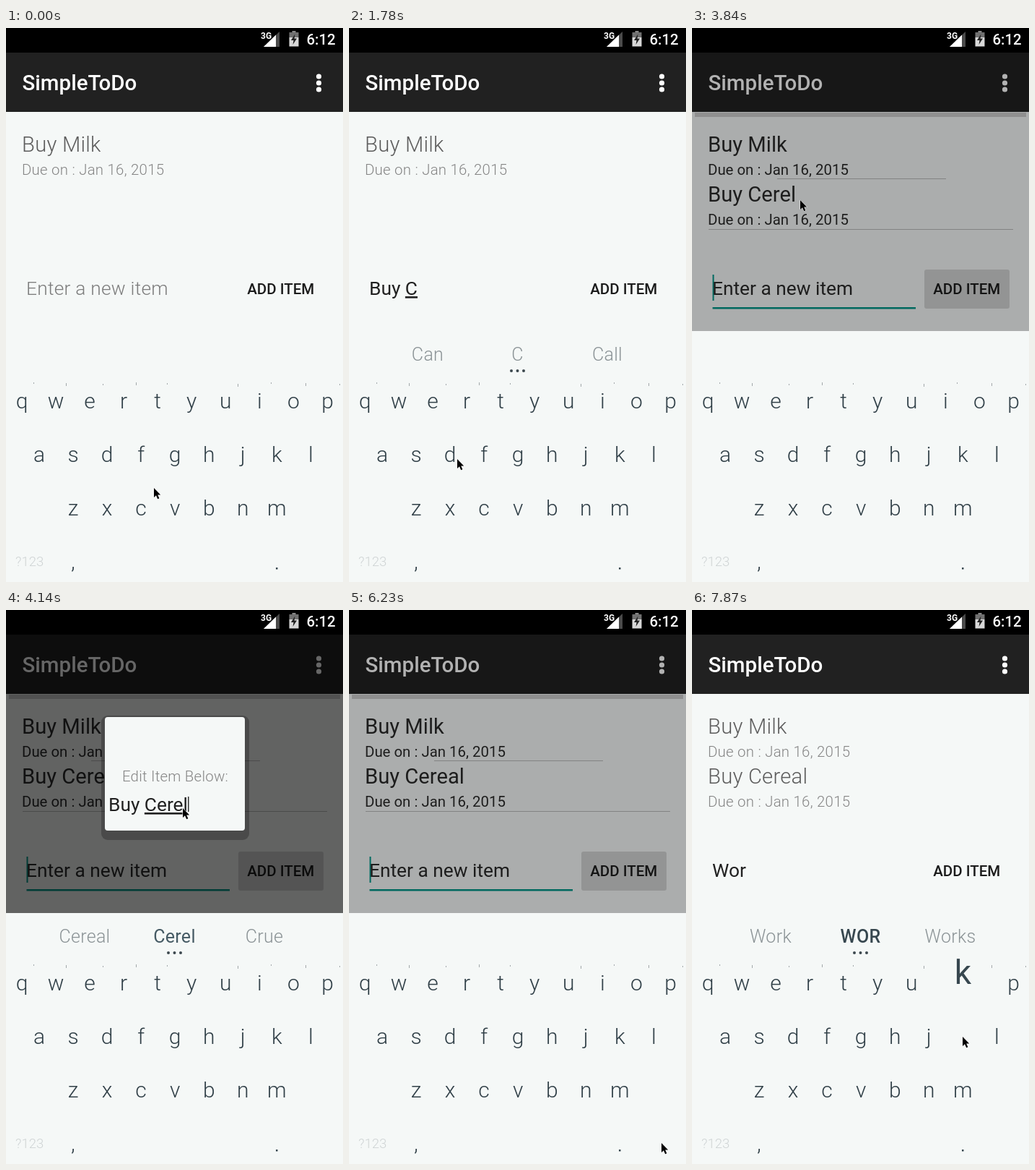
Recreate the animation shown at these times as an HTML page. Size 467 by 766 pixels, loop 8000 ms.

```html
<!DOCTYPE html>
<html lang="en">
<head>
<meta charset="utf-8">
<title>To-do list</title>
<style>
  html, body { margin: 0; width: 100%; height: 100%; overflow: hidden; background: #f5f8f7; }
  svg { display: block; width: 467px; height: 766px; font-family: Roboto, sans-serif; }
  .mid { text-anchor: middle; }
  .title { font-size: 29.5px; font-weight: 500; fill: #fff; }
  .clock { font-size: 20.4px; font-weight: 500; fill: #fff; }
  .net { font-size: 12px; font-weight: 700; fill: #fff; }
  .item, .due, .field.empty { font-weight: 300; letter-spacing: .25px; }
  .item { font-size: 29.2px; fill: #5c5c5c; }
  .due { font-size: 20.4px; fill: #858585; }
  .field { font-size: 26.3px; fill: #212121; }
  .field.empty { fill: #7c7c7c; }
  .add { font-size: 20.5px; font-weight: 500; fill: #1c1c1c; }
  .dimmed :is(.item, .due, .field) { font-weight: 400; letter-spacing: 0; fill: #2a2a2a; }
  .under { text-decoration: underline 1.2px; }
  .key { font-size: 30px; font-weight: 300; fill: #303f47; }
  .big { font-size: 46px; fill: #37474f; }
  .sug { font-size: 25px; font-weight: 300; letter-spacing: .3px; fill: #8b9396; }
  .sug.long { font-size: 19px; letter-spacing: 0; }
  .sug.on { font-weight: 400; fill: #455a64; }
  .sug.strong { font-weight: 500; fill: #37474f; }
  .sym { font-size: 18.5px; font-weight: 300; fill: #cfd4d5; }
</style>
</head>
<body>
<svg id="stage" viewBox="0 0 467 766"></svg>
<script>
const LOOP = 8000, BG = '#f5f8f7';
const stage = document.getElementById('stage');

const text = (x, y, cls, s) => `<text x="${x}" y="${y}" class="${cls}">${s}</text>`;
const rect = (x, y, w, h, fill, more = '') =>
  `<rect x="${x}" y="${y}" width="${w}" height="${h}" fill="${fill}" ${more}/>`;
const dot = (x, y, r, fill) => `<circle cx="${x}" cy="${y}" r="${r}" fill="${fill}"/>`;
const path = (d, fill) => `<path d="${d}" fill="${fill}"/>`;

const rows = [['qwertyuiop', 22, 515.5], ['asdfghjkl', 46, 590], ['zxcvbnm', 93, 664]];
const keys = {};
for (const [letters, x, y] of rows)
  [...letters].forEach((c, i) => keys[c] = [x + i * 47.05, y]);

// [time, changes]: each step keeps everything it does not change
const steps = [
  [0, { at: [205, 636], caps: false, value: '', under: false, tips: [], press: '',
        second: '', dim: 0, edit: '', caret: 0 }],
  [150, { at: [25, 668], caps: true }],
  [300, { at: [284, 668], press: 'b', value: 'B' }],
  [450, { at: [296, 606], press: '', caps: false, tips: ['But', 'B', 'By'] }],
  [600, { at: [307, 520], press: 'u', value: 'Bu' }],
  [750, { at: [280, 520], press: '', tips: ['But', 'Bu', 'Buy'] }],
  [900, { at: [259, 520], press: 'y', value: 'Buy' }],
  [1050, { at: [252, 740], press: '', tips: ['By', 'But', 'Busy'] }],
  [1200, { at: [120, 708], value: 'Buy ', tips: [] }],
  [1350, { at: [25, 668], caps: true }],
  [1500, { at: [190, 668], press: 'c', value: 'Buy C', under: true }],
  [1650, { at: [150, 596], press: '', caps: false, tips: ['Can', 'C', 'Call'] }],
  [1800, { at: [119, 520], press: 'e', value: 'Buy Ce' }],
  [1950, { at: [166, 520], press: 'r', value: 'Buy Cer', tips: ['Cell', 'Ce', 'Center'] }],
  [2100, { at: [140, 520], press: '', tips: ['Cert', 'Cer', 'Certain'] }],
  [2230, { at: [119, 520], press: 'e', value: 'Buy Cere' }],
  [2380, { at: [300, 562], press: '', tips: ['Cere', 'Cereal', 'Ceremony'] }],
  [2530, { at: [425, 591], press: 'l', value: 'Buy Cerel' }],
  [2670, { at: [363, 371], press: '', tips: ['Creek', 'Cereal', 'Ceremony'] }],
  [2970, { value: '', under: false, tips: [], second: 'Buy Cerel' }],
  [3120, { at: [300, 330] }],
  [3270, { at: [210, 270] }],
  [3400, { at: [150, 238] }],
  [3700, { dim: .3 }],
  [3850, { at: [172, 246], dim: .6, edit: 'Buy Cerel' }],
  [3990, { at: [226, 268] }],
  [4140, { at: [245, 274], under: true, caret: 252, tips: ['Cereal', 'Cerel', 'Crue'] }],
  [4290, { at: [300, 380] }],
  [4440, { at: [370, 500] }],
  [4590, { at: [415, 588] }],
  [4740, { at: [433, 664], edit: 'Buy Cere', caret: 0 }],
  [4890, { at: [250, 632], tips: ['Cere', 'Cereal', 'Ceremony'] }],
  [5040, { at: [48, 591], press: 'a', edit: 'Buy Cerea' }],
  [5190, { at: [250, 594], press: '', tips: ['Cereals', 'Cereal', 'Area'] }],
  [5340, { at: [424, 591], press: 'l', edit: 'Buy Cereal' }],
  [5490, { at: [433, 737], press: '', under: false, tips: [], caret: 264 }],
  [5780, { caret: 0 }],
  [6230, { dim: .3, edit: '', second: 'Buy Cereal' }],
  [6380, { dim: 0 }],
  [6670, { at: [25, 668], caps: true }],
  [6820, { at: [50, 596] }],
  [6970, { at: [72, 520], press: 'w', value: 'W' }],
  [7120, { at: [230, 524], press: '', caps: false, tips: ['We', 'W', 'Will'] }],
  [7270, { at: [400, 520], press: 'o', value: 'Wo' }],
  [7420, { at: [280, 520], press: '', tips: ['Would', 'Wo', 'Work'] }],
  [7570, { at: [167, 520], press: 'r', value: 'Wor' }],
  [7720, { at: [290, 562], press: '', tips: ['Work', 'WOR', 'Works'] }],
  [7870, { at: [375, 590], press: 'k' }],
];
const states = [];
for (const [, change] of steps) states.push({ ...states.at(-1), ...change });

const statusBar =
  rect(0, 0, 467, 34, '#000') + text(353, 15, 'net', '3G') +
  path('M357 26H379V5z', '#4a4a4a') + path('M357 26H374V9.5z', '#fff') +
  rect(396.5, 4, 5, 3, '#888') + rect(392.5, 6, 13, 7, '#707070') + rect(392.5, 13, 13, 12.5, '#d8d8d8') +
  path('M400.5 8.5L395 17H398.5L397.5 23L403 14.5H399.5z', '#222') +
  text(416.5, 23, 'clock', '6:12');

const actionBar =
  rect(0, 34, 467, 82, '#212121') + text(22.5, 86, 'title', 'SimpleToDo') +
  [67, 76, 85].map(y => dot(433.5, y, 3.6, '#fff')).join('');

const entry = (name, y) =>
  text(22, y, 'item', name) + text(22, y + 32, 'due', 'Due on : Jan 16, 2015');

// Marks the word being composed
const typed = (s, under) =>
  under ? s.replace(/\S+$/, '<tspan class="under">$&</tspan>') : s;

// Details that only show up while the screen is darkened
const widgets =
  rect(4, 117, 459, 6, '#ccc') + rect(118, 208, 234, 1, '#bbb') + rect(23, 278, 422, 1, '#bbb') +
  rect(322, 334, 118, 54, '#d2d4d3', 'rx="3"') +
  rect(28.5, 386, 281.5, 2.5, '#009688') + rect(28.5, 341, 2, 36, '#009688');

function screen(s) {
  const field = s.value
    ? text(28, 369, 'field', typed(s.value, s.under))
    : text(28, 369, 'field empty', 'Enter a new item');
  return `<g class="${s.dim ? 'dimmed' : ''}">` + actionBar + (s.dim ? widgets : '') +
    entry('Buy Milk', 171) + (s.second ? entry(s.second, 240) : '') +
    field + text(380.7, 368, 'add mid', 'ADD ITEM') + '</g>' +
    (s.dim ? rect(0, 34, 467, 385, '#000', `opacity="${s.dim}"`) : '');
}

function dialog(s) {
  if (!s.edit) return '';
  return rect(132, 146, 205, 172, '#000', 'rx="9" opacity=".25"') +
    rect(137, 148, 194, 157, BG, 'rx="4"') +
    text(234.5, 237, 'due mid', 'Edit Item Below:') +
    text(142, 278, 'field', typed(s.edit, s.under)) +
    (s.caret ? rect(s.caret, 258, 1.5, 21, '#333') : '');
}

function suggestions(tips) {
  if (!tips.length) return '';
  const style = w =>
    w.length > 7 ? ' long' : w === 'WOR' ? ' strong' : w === 'Cerel' ? ' on' : '';
  return tips.map((w, i) => text(109 + i * 124.5, 460, 'sug mid' + style(w), w)).join('') +
    [225, 233.5, 242].map(x => dot(x, 474, 2, '#3c484e')).join('');
}

function popup(c, label) {
  const [x, y] = keys[c];
  return rect(x - 38, y - 112, 76, 72, BG) + rect(x - 21, y - 41, 42, 61, BG) +
    text(x, y - 73, 'big mid', label);
}

const hints = [38, 83, 134, 180, 223, 321, 367, 415, 462]
  .map((x, i) => rect(x, 490 + i % 3, 1, i % 2 ? 4 : 2, '#a2a8aa')).join('');

function keyboard(s) {
  const label = c => s.caps ? c.toUpperCase() : c;
  return rect(0, 419, 467, 347, BG) + suggestions(s.tips) + hints +
    Object.entries(keys).map(([c, [x, y]]) => text(x, y + 10, 'key mid', label(c))).join('') +
    text(13, 744, 'sym', '?123') + text(93, 748, 'key mid', ',') +
    rect(374, 746, 2.5, 2.5, '#37474f') +
    (s.press ? popup(s.press, label(s.press)) : '');
}

const pointer = ([x, y]) =>
  `<path transform="translate(${x} ${y})" d="M0 0V13L3 10.2L5.2 15.2L7.4 14.2L5.2 9.4H9.2z" ` +
  'stroke="#fff" stroke-width="1" paint-order="stroke"/>';

let shown = -1;
const start = performance.now();
function tick() {
  const t = (performance.now() - start) % LOOP;
  const now = steps.findLastIndex(([time]) => time <= t);
  if (now !== shown) {
    const s = states[shown = now];
    stage.innerHTML = rect(0, 0, 467, 766, BG) + statusBar + screen(s) + dialog(s) +
      keyboard(s) + pointer(s.at);
  }
  requestAnimationFrame(tick);
}
tick();
</script>
</body>
</html>
```
